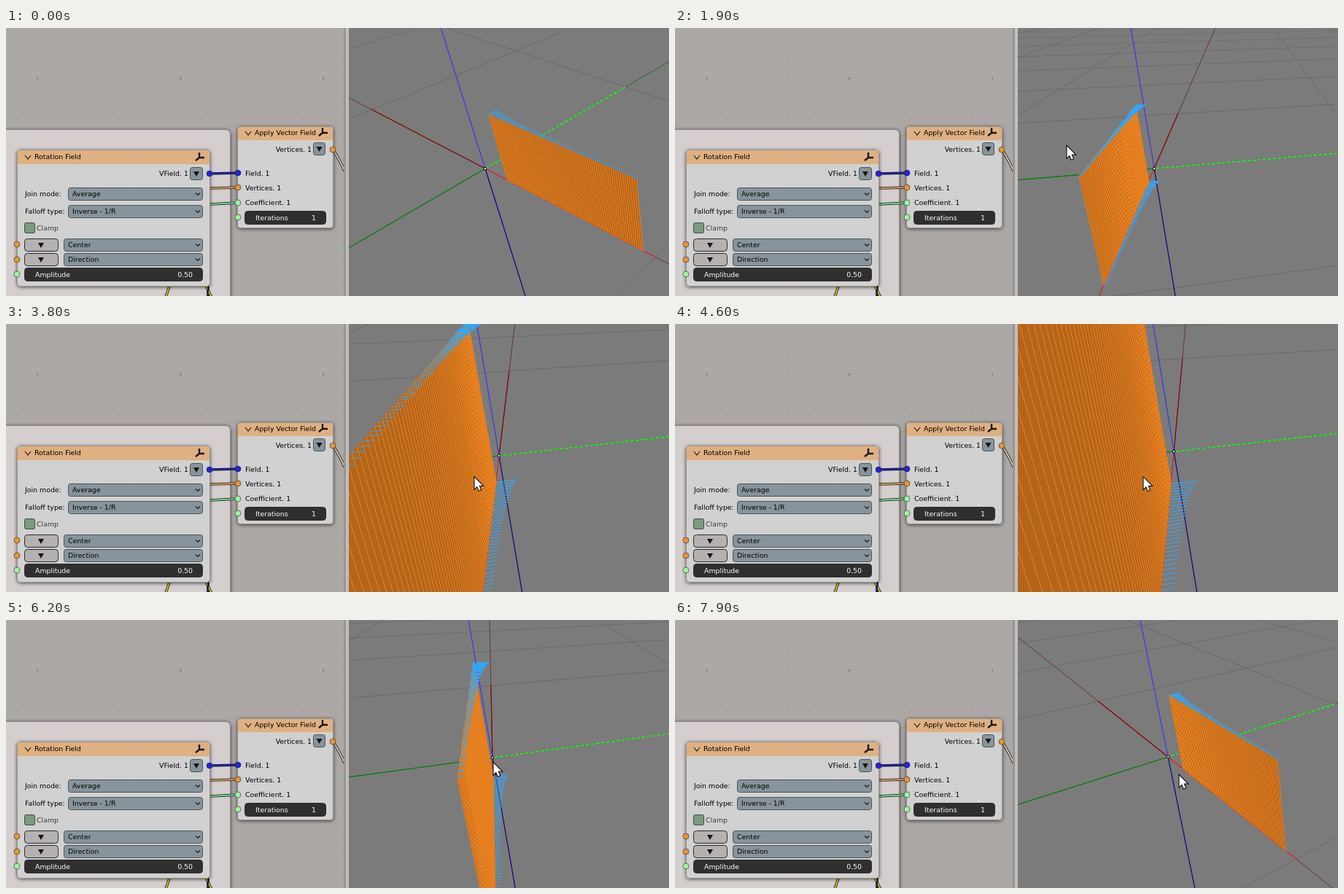
These frames come from a looping animation (909x368 px, 8000 ms). An HTML page with a canvas:

```html
<!DOCTYPE html>
<html lang="en">
<head>
<meta charset="utf-8">
<title>Rotation field</title>
<style>
  html, body { margin: 0; width: 100%; height: 100%; overflow: hidden; background: #aca8a5; }
  svg, canvas { position: absolute; top: 0; left: 0; display: block; }
  canvas { left: 470px; }
  text { font: 9.4px "DejaVu Sans", sans-serif; fill: #000; }
  .end { text-anchor: end; }
  .light { fill: #fff; }
  .field { fill: #87949b; stroke: #4b5357; }
  .button { fill: #b4b1b0; stroke: #2a2a2a; }
  .slider { fill: #302f2f; stroke: #302f2f; }
  .node { fill: #d1d0d0; stroke: #99938e; }
  .head { fill: #dfb081; }
  .chevron { fill: none; stroke: #1a1a1a; stroke-width: 1.2; }
  .link { fill: none; stroke: #191919; stroke-width: 3.6; }
  .core { fill: none; stroke-width: 1.8; }
  .orange { fill: #e4963a; }
  .green { fill: #9df2a0; }
  .blue { fill: #2020e0; }
  circle { stroke: #2c2c2c; stroke-width: .6; }
</style>
</head>
<body>
<svg width="470" height="368">
  <defs>
    <pattern id="dots" x="1" y="0" width="28" height="28" patternUnits="userSpaceOnUse">
      <rect x="13.5" y="12.5" width="1.5" height="1.5" fill="#8f8b89"/>
    </pattern>
    <pattern id="grain" width="4" height="4" patternUnits="userSpaceOnUse">
      <rect width="1" height="1" fill="#dcdbdb"/>
    </pattern>
    <filter id="shadow" x="-10%" y="-10%" width="120%" height="125%">
      <feDropShadow dx="0" dy="1" stdDeviation="2.8" flood-color="#000" flood-opacity=".65"/>
    </filter>
    <path id="axes" d="M0 1V-6M0 1H7M0 1L-5 5" fill="none" stroke="#1b1511" stroke-width="2.4"/>
    <path id="open" class="chevron" d="M-4-2L0 3L4-2"/>
    <path id="pick" class="chevron" d="M-3-1.5L0 1.5L3-1.5"/>
    <path id="down" d="M-4-3H4L0 4Z" fill="#151515"/>
  </defs>

  <rect width="470" height="368" fill="#aca8a5"/>
  <rect width="464" height="368" fill="url(#dots)"/>
  <g fill="#85817f">
    <rect x="42" y="68" width="2.5" height="2.5"/>
    <rect x="238" y="68" width="2.5" height="2.5"/>
    <rect x="434" y="68" width="2.5" height="2.5"/>
  </g>
  <rect x="-10" y="139.500" width="317.500" height="250" rx="6" fill="#d4cecf" stroke="#8a8584" filter="url(#shadow)"/>

  <g class="link">
    <path d="M280 220L318 219M280 242L318 240M279 200L318 199M448 167Q456 178 467 202"/>
    <path d="M225 352L218 372M273 352L284 374"/>
    <path d="M277 352V370"/>
  </g>
  <g class="core">
    <path d="M280 220L318 219" stroke="#d5a057"/>
    <path d="M280 242L318 240" stroke="#7ad58a"/>
    <path d="M279 200L318 199" stroke="#2222b4"/>
    <path d="M448 167Q456 178 467 202" stroke="#e5d8c8"/>
    <path d="M225 352L218 372M273 352L284 374" stroke="#d5cf2a"/>
    <path d="M277 356V370" stroke="#20205c"/>
  </g>

  <g filter="url(#shadow)">
    <rect class="node" x="15.500" y="167.500" width="264" height="187" rx="4"/>
    <rect class="node" x="317.500" y="135.500" width="131" height="139" rx="4"/>
  </g>
  <path class="head" d="M16 187V172Q16 168 20 168H275Q279 168 279 172V187Z"/>
  <path class="head" d="M318 154V140Q318 136 322 136H444Q448 136 448 140V154Z"/>
  <rect x="17" y="188" width="262" height="165" fill="url(#grain)"/>
  <rect x="319" y="155" width="129" height="118" fill="url(#grain)"/>

  <use href="#open" x="30" y="177"/>
  <text x="39" y="180">Rotation Field</text>
  <use href="#axes" x="265" y="177"/>
  <text class="end" x="250" y="203">VField. 1</text>
  <rect class="field" x="252.500" y="191.500" width="17" height="17" rx="3"/>
  <use href="#down" x="261" y="200"/>

  <text x="26" y="231">Join mode:</text>
  <rect class="field" x="85.500" y="219.500" width="184" height="17" rx="3"/>
  <text x="91" y="231">Average</text>
  <use href="#pick" x="263" y="228"/>
  <text x="26" y="255">Falloff type:</text>
  <rect class="field" x="85.500" y="243.500" width="184" height="17" rx="3"/>
  <text x="91" y="255">Inverse - 1/R</text>
  <use href="#pick" x="263" y="252"/>
  <rect x="25.500" y="267.500" width="14" height="14" rx="2" fill="#7c9a80" stroke="#3e4f41"/>
  <text x="42" y="278" style="fill:#3a3a3a">Clamp</text>

  <rect class="button" x="25.500" y="289.500" width="46" height="17" rx="4"/>
  <use href="#down" x="48" y="298"/>
  <rect class="field" x="79.500" y="289.500" width="190" height="17" rx="3"/>
  <text x="85" y="301">Center</text>
  <use href="#pick" x="263" y="298"/>
  <rect class="button" x="25.500" y="309.500" width="46" height="17" rx="4"/>
  <use href="#down" x="48" y="318"/>
  <rect class="field" x="79.500" y="309.500" width="190" height="17" rx="3"/>
  <text x="85" y="321">Direction</text>
  <use href="#pick" x="263" y="318"/>
  <rect class="slider" x="25.500" y="329.500" width="244" height="18" rx="4"/>
  <text class="light" x="40" y="342">Amplitude</text>
  <text class="light end" x="256" y="342">0.50</text>

  <use href="#open" x="332" y="144"/>
  <text x="341" y="147">Apply Vector Field</text>
  <use href="#axes" x="434" y="143"/>
  <text class="end" x="419" y="170">Vertices. 1</text>
  <rect class="field" x="421.500" y="157.500" width="16" height="17" rx="3"/>
  <use href="#down" x="429.500" y="166"/>
  <text x="328" y="203">Field. 1</text>
  <text x="328" y="223">Vertices. 1</text>
  <text x="328" y="243">Coefficient. 1</text>
  <rect class="slider" x="327.500" y="251.500" width="111" height="18" rx="4"/>
  <text class="light" x="342" y="264">Iterations</text>
  <text class="light end" x="425" y="264">1</text>

  <circle class="blue" cx="279" cy="200" r="4"/>
  <circle class="blue" cx="318" cy="199" r="4"/>
  <circle class="orange" cx="318" cy="219" r="4"/>
  <circle class="green" cx="318" cy="240" r="4"/>
  <circle class="green" cx="318" cy="260" r="4"/>
  <circle class="orange" cx="448" cy="167" r="4"/>
  <circle class="orange" cx="15" cy="297" r="4"/>
  <circle class="orange" cx="15" cy="318" r="4"/>
  <circle class="green" cx="15" cy="338" r="4"/>

  <rect x="463" width="7" height="368" fill="#999593"/>
  <rect x="466" width="4" height="368" fill="#c2bebd"/>
</svg>
<canvas id="view" width="439" height="368"></canvas>

<script>
const ctx = document.getElementById("view").getContext("2d");
const LEFT = 470, WIDTH = 439, HEIGHT = 368;
const CENTER_X = 945, CENTER_Y = 180, FOCAL = 660, NEAR = 0.1;
const CELL = 6.4, COLUMNS = 75, TOP = 2.2, PUSH = 0.27;
const ARROW = new Path2D("M.5 .5V16L4 12.500L6.500 18.500L9 17.500L6.500 11.500H11.500Z");

// time, origin x, origin y, yaw, pitch, distance
const CAMERA = [
  [900, 657, 193, -33.7, 35.4, 14.35],
  [1900, 657, 193, -76.1, 20.65, 14.35],
  [3100, 657, 193, -71.7, 22.5, 14.35],
  [3400, 657, 193, -71.7, 22.5, 14.35],
  [3800, 676, 181, -71.7, 22.5, 7.6],
  [4000, 679, 179, -71.7, 22.5, 7],
  [4200, 679, 179, -71.7, 22.5, 7],
  [4600, 684, 175, -71.7, 22.5, 6.2],
  [4900, 684, 175, -71.7, 22.5, 6.2],
  [5200, 678, 180, -71.7, 22.5, 7.3],
  [5300, 678, 180, -71.7, 22.5, 7.3],
  [5600, 672, 185, -71.7, 22.5, 8.6],
  [5700, 672, 185, -71.7, 22.5, 8.6],
  [6000, 667, 189, -70.5, 22.5, 10.1],
  [6100, 667, 189, -70.5, 22.5, 10.1],
  [6200, 667, 189, -68.3, 22.35, 10.1],
  [7900, 676, 188, -46.9, 26.4, 14.2]
];
// time, pointer x, pointer y
const POINTER = [
  [200, 790, 73], [800, 653, 202], [900, 653, 202], [1900, 537, 162],
  [3100, 634, 207], [3300, 642, 210], [5700, 642, 211], [6200, 668, 196], [7900, 691, 213]
];

function sample(keys, t) {
  if (t <= keys[0][0]) return keys[0].slice(1);
  const i = keys.findIndex(k => k[0] >= t);
  const a = keys[i - 1], b = keys[i], p = (t - a[0]) / (b[0] - a[0]);
  return a.map((v, j) => v + (b[j] - v) * p).slice(1);
}

let toCamera;
function setCamera([ox, oy, yaw, pitch, dist]) {
  const rad = Math.PI / 180;
  const cy = Math.cos(yaw * rad), sy = Math.sin(yaw * rad);
  const cp = Math.cos(pitch * rad), sp = Math.sin(pitch * rad);
  toCamera = (x, y, z) => {
    const right = x * cy - y * sy, ahead = x * sy + y * cy;
    return [
      dist * (ox - CENTER_X) / FOCAL + right,
      dist * (oy - CENTER_Y) / FOCAL - ahead * sp - z * cp,
      dist + ahead * cp - z * sp
    ];
  };
}
const toScreen = ([x, y, z]) => [CENTER_X - LEFT + FOCAL * x / z, CENTER_Y + FOCAL * y / z];
const project = (x, y, z) => toScreen(toCamera(x, y, z));

function line(from, to, colour, dash = []) {
  let a = toCamera(...from), b = toCamera(...to);
  if (a[2] < b[2]) [a, b] = [b, a];
  if (a[2] < NEAR) return;
  if (b[2] < NEAR) {
    const p = (a[2] - NEAR) / (a[2] - b[2]);
    b = a.map((v, i) => v + (b[i] - v) * p);
  }
  ctx.strokeStyle = colour;
  ctx.setLineDash(dash);
  ctx.beginPath();
  ctx.moveTo(...toScreen(a));
  ctx.lineTo(...toScreen(b));
  ctx.stroke();
  ctx.setLineDash([]);
}

// Unsmoothed line, so that dense columns form moiré bands.
function pixelLine([x0, y0], [x1, y1]) {
  const steps = Math.ceil(Math.max(Math.abs(x1 - x0), Math.abs(y1 - y0), 1));
  for (let i = 0; i <= steps; i++) {
    const x = Math.round(x0 + (x1 - x0) * i / steps);
    const y = Math.round(y0 + (y1 - y0) * i / steps);
    if (x >= 0 && x < WIDTH && y >= 0 && y < HEIGHT) ctx.fillRect(x, y, 1, 1);
  }
}

function drawFloor() {
  const far = 14 * CELL;
  ctx.lineWidth = 1;
  for (let k = -13; k <= 13; k++) {
    if (!k) continue;
    const colour = `rgba(92,92,92,${0.6 * (1 - Math.abs(k) / 15)})`;
    line([k * CELL, -far, 0], [k * CELL, far, 0], colour);
    line([-far, k * CELL, 0], [far, k * CELL, 0], colour);
  }
  line([-far, 0, 0], [far, 0, 0], "#6a3434");
  line([0, -far, 0], [0, far, 0], "#2c6a2c");
  ctx.lineWidth = 1.2;
  line([0, 0, 0], [-CELL, 0, 0], "#850808");
  line([0, 0, 0], [CELL, 0, 0], "#e82828");
  line([0, 0, 0], [0, -CELL * 2, 0], "#078007");
  line([0, 0, 0], [0, CELL, 0], "#12b812");
  line([0, 0, 0], [0, CELL, 0], "#3cf03c", [5, 2]);
  line([0, 0, 0], [0, 0, -CELL * 2], "#06067c");
  line([0, 0, 0], [0, 0, CELL], "#3838f0");
}

function drawSheet() {
  const xs = Array.from({ length: COLUMNS + 1 }, (_, i) => 1 + 5 * i / COLUMNS);
  const drawPushes = z => {
    ctx.fillStyle = "#35a5f5";
    for (const x of xs) pixelLine(project(x, 0, z), project(x, PUSH / x, z));
  };
  drawPushes(0);
  ctx.fillStyle = "#b5651a";
  ctx.beginPath();
  for (const [x, z] of [[1, 0], [1, TOP], [6, TOP], [6, 0]]) ctx.lineTo(...project(x, 0, z));
  ctx.fill();
  ctx.fillStyle = "#e57f20";
  for (const x of xs) pixelLine(project(x, 0, 0), project(x, 0, TOP));
  drawPushes(TOP);
}

function drawPointer(x, y) {
  ctx.save();
  ctx.translate(x - LEFT, y);
  ctx.fillStyle = "#fff";
  ctx.strokeStyle = "#000";
  ctx.lineWidth = 2;
  ctx.stroke(ARROW);
  ctx.fill(ARROW);
  ctx.restore();
}

function draw(t) {
  setCamera(sample(CAMERA, t));
  ctx.fillStyle = "#7b7b7b";
  ctx.fillRect(0, 0, WIDTH, HEIGHT);
  drawFloor();
  drawSheet();
  const [x, y] = project(0, 0, 0);
  ctx.fillStyle = "#222";
  ctx.fillRect(x - 2, y - 2, 4, 4);
  ctx.fillStyle = "#eee";
  ctx.fillRect(x - 1, y - 1, 2, 2);
  if (t >= 100) drawPointer(...sample(POINTER, t));
}

let shown = -1;
function tick() {
  const t = Math.floor(performance.now() % 8000 / 100) * 100;
  if (t !== shown) draw(shown = t);
  requestAnimationFrame(tick);
}
tick();
</script>
</body>
</html>
```
